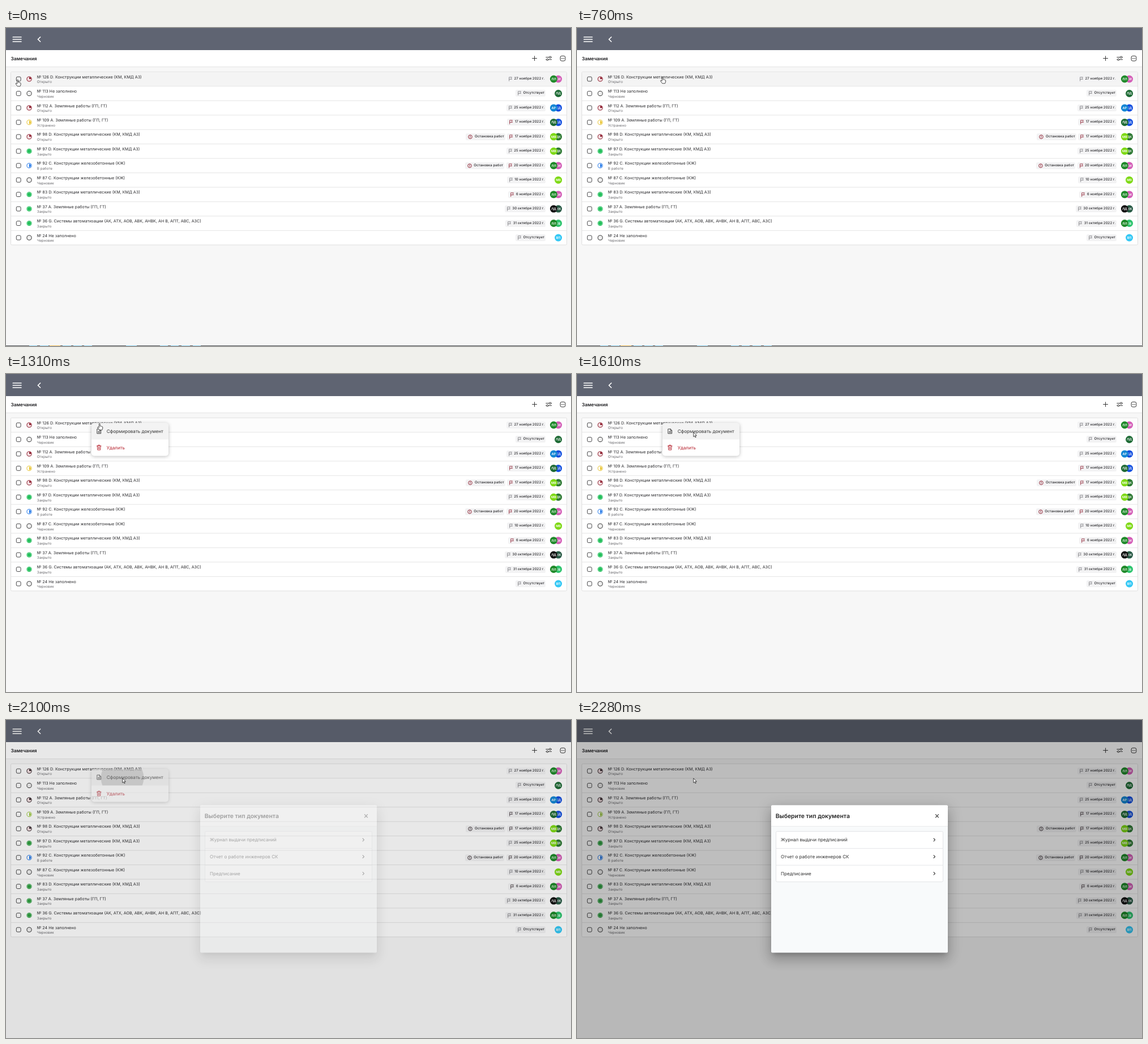
These frames come from a looping animation (998x561 px, 2.46 s). An HTML page:

```html
<!DOCTYPE html>
<html lang="ru">
<head>
<meta charset="utf-8">
<title>Замечания</title>
<style>
html, body { margin: 0; width: 100%; height: 100%; overflow: hidden; background: #f7f7f7; }
#stage { position: relative; width: 998px; height: 561px; overflow: hidden; background: #f7f7f7;
  font-family: Inter, "Noto Sans", sans-serif; text-rendering: geometricPrecision;
  --red: #8b1a2b; --yellow: #e8c22a; --green: #22bf5b; }
#stage.dimmed { --red: #33262b; --yellow: #9ac93a; --green: #2f9f40; }
svg { display: block; }
.layer { position: absolute; left: 0; top: 0; }
.line { fill: none; stroke-linecap: round; stroke-linejoin: round; }
.title { font-size: 7.17px; fill: #2b2b2e; }
.state { font-size: 6.24px; fill: #68686c; }
.item { font-size: 8.1px; fill: #333; }
.ava { font-size: 5.6px; font-weight: 600; fill: #fff; text-anchor: middle; }
.pills { position: absolute; right: 45px; height: 12px; display: flex; gap: 3.5px; }
.pill { display: flex; align-items: center; gap: 3.5px; padding: 0 2px 0 4px; border-radius: 2.5px;
  background: #f3f3f4; color: #2b2b2e; font-size: 6.15px; font-weight: 500; line-height: 12px; white-space: nowrap; }
</style>
</head>
<body>
<div id="stage"></div>
<script>
const LOOP = 2460, TOP = 77.3, PITCH = 25.45;
const RED = 'var(--red)', YELLOW = 'var(--yellow)', GREEN = 'var(--green)', GREY = '#77777b', DARK = '#333';

const STEEL = 'Конструкции металлические (КМ, КМД АЗ)';
const CONCRETE = 'Конструкции железобетонные (КЖ)';
const EARTH = 'Земляные работы (ГП, ГТ)';
const STATES = { open: 'Открыто', draft: 'Черновик', fixed: 'Устранено', closed: 'Закрыто', work: 'В работе' };
const LL = ['ЛЛ', '#1f8a2a'], SI = ['СИ', '#d45fb8'], MV = ['МВ', '#7ed915'],
      DK = ['ДК', '#2f7a35'], KD = ['КД', '#1450e0'], LD = ['ЛД', '#1e6b35'];

// title, state, date, avatars, late, stopped
const ROWS = [
  ['№ 126 D. ' + STEEL, 'open', '27 ноября 2022 г.', [LL, SI]],
  ['№ 113 Не заполнено', 'draft', 'Отсутствует', [LD]],
  ['№ 112 А. ' + EARTH, 'open', '25 ноября 2022 г.', [['АР', '#1487d4'], KD]],
  ['№ 109 А. ' + EARTH, 'fixed', '17 ноября 2022 г.', [LD, KD], 1],
  ['№ 98 D. ' + STEEL, 'open', '17 ноября 2022 г.', [MV, DK], 1, 1],
  ['№ 97 D. ' + STEEL, 'closed', '25 ноября 2022 г.', [MV, DK]],
  ['№ 92 С. ' + CONCRETE, 'work', '20 ноября 2022 г.', [LL, SI], 1, 1],
  ['№ 87 С. ' + CONCRETE, 'draft', '10 ноября 2022 г.', [MV]],
  ['№ 83 D. ' + STEEL, 'closed', '6 ноября 2022 г.', [LL, SI], 1],
  ['№ 37 А. ' + EARTH, 'closed', '30 октября 2022 г.', [['ЛД', '#111'], ['ЖК', '#285a45']]],
  ['№ 36 G. Системы автоматизации (АК, АТХ, АОВ, АВК, АНВК, АН В, АПТ, АВС, АЗС)', 'closed',
    '31 октября 2022 г.', [LL, ['ЕВ', '#2fc56f']]],
  ['№ 24 Не заполнено', 'draft', 'Отсутствует', [['ВП', '#35c8f5']]]
];

const rect = (x, y, w, h, fill, more = '') =>
  `<rect x="${x}" y="${y}" width="${w}" height="${h}" fill="${fill}" ${more}/>`;
const circle = (x, y, r, fill, more = '') => `<circle cx="${x}" cy="${y}" r="${r}" fill="${fill}" ${more}/>`;
const line = (d, color, width = 1) => `<path class="line" d="${d}" stroke="${color}" stroke-width="${width}"/>`;
const text = (x, y, cls, s, more = '') => `<text x="${x}" y="${y}" class="${cls}" ${more}>${s}</text>`;
const svg = body => `<svg class="layer" width="998" height="561" viewBox="0 0 998 561">${body}</svg>`;

function stateIcon(kind, y) {
  const ring = (color, fill) => circle(41, y, 4.1, fill, `stroke="${color}"`);
  const half = color => ring(color, '#fff') + `<path d="M41 ${y - 2.9}a2.9 2.9 0 0 1 0 5.8z" fill="${color}"/>`;
  switch (kind) {
    case 'open': return ring(RED, '#f3dfe1') + `<path d="M41 ${y}v-3.4a3.4 3.4 0 0 1 3.4 3.4z" fill="${RED}"/>`;
    case 'draft': return ring(DARK, '#f0f0f0');
    case 'fixed': return half(YELLOW);
    case 'work': return half('#1c74e8');
    default: return ring(GREEN, '#c9f0d7') + circle(41, y, 3.2, GREEN);
  }
}

function avatars(list, y) {
  const xs = list.length > 1 ? [967.4, 975.6] : [975.6];
  return list.map(([name, color], i) =>
    circle(xs[i], y, 6.5, color) + text(xs[i], y + 2, 'ava', name)).reverse().join('');
}

function row([title, state, , people], i) {
  const y = TOP + PITCH * (i + .5);
  return (i ? rect(9, y - PITCH / 2 - .4, 981, .9, '#e2e2e2') : '') +
    rect(18.3, y - 3.9, 7.8, 7.8, 'none', 'rx="2" stroke="#3a3a3d" stroke-width=".95"') +
    stateIcon(state, y) +
    text(54.5, y - 1.4, 'title', title) + text(54.8, y + 7.4, 'state', STATES[state]) + avatars(people, y);
}

function pills([, , date, , late, stopped], i) {
  const flag = `<svg width="6" height="8" viewBox="0 0 6 8">${line('M.7 7.4V.8H5.4L4.4 2.6 5.4 4.4H.7', late ? RED : GREY, .8)}</svg>`;
  const alarm = `<svg width="8" height="8" viewBox="0 0 8 8">${circle(4, 4, 3.3, 'none', `stroke="${RED}" stroke-width=".9"`)}${line('M4 2.2V4.3M4 5.7V5.8', RED, .9)}</svg>`;
  const pill = (icon, s) => `<span class="pill">${icon}${s}</span>`;
  return `<div class="pills" style="top:${TOP + PITCH * (i + .5) - 6}px">` +
    (stopped ? pill(alarm, 'Остановка работ') : '') + pill(flag, date) + '</div>';
}

const header = rect(0, 0, 998, 39, '#5f6472') +
  [16, 20, 24].map(y => line(`M12.3 ${y}H26.9`, '#fff', 1.7)).join('') +
  line('M60.6 16L56.4 20 60.6 24', '#fff', 1.7);

const toolbar = rect(0, 39, 998, 29, '#fff') + rect(0, 68, 998, 1, '#e4e4e4') +
  text(8.4, 56.6, '', 'Замечания', 'font-size="8.32" font-weight="600" fill="#1d1d20"') +
  line('M929.6 53.6h8M933.6 49.6v8', DARK) +
  line('M953.8 51.6h5.6M962.8 51.6h.8M953.8 55.7h.8M958 55.7h5.6', DARK) +
  circle(961.1, 51.6, 1.6, 'none', 'stroke="#333"') + circle(956.3, 55.7, 1.6, 'none', 'stroke="#333"') +
  rect(979.1, 49.3, 8.8, 8.8, 'none', 'rx="2.6" stroke="#333"') +
  [981.4, 983.5, 985.6].map(x => circle(x, 53.7, .7, DARK)).join('');

const table = rect(8.5, 77.3, 982, PITCH * 12, '#fff', 'rx="2" stroke="#e0e0e0"') +
  `<clipPath id="firstRow">${rect(9, 77.8, 981, 24.6, '#000')}</clipPath>` +
  `<g clip-path="url(#firstRow)">${rect(9, 77, 981, 26, '#f4f4f4', 'id="hover"')}${circle(151, 92, 0, '#000', 'id="rowRipple"')}</g>` +
  ROWS.map(row).join('');

const taskbar = rect(0, 560, 998, 1, '#55585c') +
  [[41, 14], [60, 15], [100, 15], [119, 15], [138, 14], [212, 19], [272, 14], [291, 14], [310, 15], [330, 14]]
    .map(([x, w]) => rect(x, 560, w, 1, '#8fd0ee')).join('') + rect(77, 560, 19, 1, '#f0c060');

const menu = `<clipPath id="firstItem">${rect(151, 86.5, 136, 29, '#000')}</clipPath>
  <clipPath id="menuBox">${rect(151, 86.5, 136, 58, '#000', 'rx="5"')}</clipPath>
  <g id="menu">${rect(151, 86.5, 136, 58, '#fff', 'rx="5" style="filter:drop-shadow(0 1px 3px #0004)"')}
  <g clip-path="url(#menuBox)">${rect(151, 86.5, 136, 29, '#f3f3f3')}
  <g clip-path="url(#firstItem)">${circle(205.5, 102, 0, '#000', 'id="itemRipple" opacity=".17"')}</g></g>` +
  line('M161.2 97h4l2.4 2.4v5.6h-6.4zM165 97v2.6h2.6M162.8 101.4h3.2M162.8 103.2h3.2', DARK, .9) +
  text(177.7, 103.9, 'item', 'Сформировать документ') +
  line('M160.4 127h7.6M161.2 127l.6 7h4.8l.6-7M162.6 127v-1.6h3.2v1.6M163.4 129.2v2.8M165 129.2v2.8', '#b5202c', .9) +
  text(177.7, 132.9, 'item', 'Удалить', 'style="fill:#b5202c"') + '</g>';

const BOX = { x: 343, y: 150.6, w: 312, h: 259.9 };
const shadow = (dy, blur, spread, alpha) =>
  rect(BOX.x - spread, BOX.y - spread + dy, BOX.w + 2 * spread, BOX.h + 2 * spread, '#000',
    `opacity="${alpha}" style="filter:blur(${blur / 2}px)"`);

const dialog = '<g id="dialog">' +
  shadow(5.7, 7.8, -3.6, .2) + shadow(12.5, 19.8, 1.6, .14) + shadow(4.7, 24, 4.2, .12) +
  rect(BOX.x, BOX.y, BOX.w, BOX.h, '#f8fafb', 'rx="2"') +
  `<path d="M343 187.5V152.6a2 2 0 0 1 2-2H653a2 2 0 0 1 2 2V187.5z" fill="#fff"/>` +
  rect(343, 187.2, 312, .9, '#e6e8ea') +
  text(350.7, 173.1, '', 'Выберите тип документа', 'font-size="10.4" font-weight="600" fill="#222"') +
  line('M633.4 166.7l5.2 5.2M638.6 166.7l-5.2 5.2', DARK, 1.1) +
  rect(351.5, 196.5, 295, 89, '#fff', 'rx="2" stroke="#e2e4e7"') +
  ['Журнал выдачи предписаний', 'Отчет о работе инженеров СК', 'Предписание'].map((s, i) => {
    const y = 211.4 + i * 29.7;
    return text(360, y + 3, 'item', s) + line(`M630.1 ${y - 2.4}l2.4 2.4-2.4 2.4`, DARK, 1.1) +
      (i ? rect(352, y - 15.1, 294, .9, '#e2e4e7') : '');
  }).join('') + '</g>';

const pointer = 'stroke="#111" stroke-width=".75" stroke-linejoin="round" fill="#fff"';
const cursor = `<g id="cursor">
  <path id="hand" ${pointer} d="M-1.8 1.2V-4.7a.9.9 0 0 1 1.8 0V-1.1q.9-.5 1.6.3 .9-.4 1.5.4 1.4-.2 1.5 1.2V3L3.5 5.8H-1.3L-4.2 1.9q-.8-1.3.4-1.5Q-2.8.3-1.8 1.6z"/>
  <path id="arrow" ${pointer} d="M-2.6-4.8V3.1L-.8 1.5 .5 4.3 1.8 3.7 .5 1H2.9z"/></g>`;

const stage = document.getElementById('stage');
stage.innerHTML =
  svg(header + toolbar + table + `<g id="taskbar">${taskbar}</g>`) + ROWS.map(pills).join('') +
  svg(menu + rect(0, 0, 998, 561, '#000', 'id="dim"') + dialog + cursor);

const $ = Object.fromEntries([...stage.querySelectorAll('[id]')].map(el => [el.id, el]));

// [ms, value] pairs, linear between
const TRACKS = {
  x: [[1200, 152], [1310, 166], [1460, 190], [1610, 208.4]],
  y: [[1200, 92], [1310, 93], [1460, 101], [1610, 107.6]],
  hover: [[1180, 1], [1320, .25]],
  rowR: [[940, 0], [1010, 88], [1300, 460]],
  rowA: [[1100, .11], [1250, 0]],
  menuIn: [[1150, 0], [1270, 1]],
  menuOut: [[2065, 1], [2100, .72], [2180, 0]],
  itemR: [[1950, 0], [2060, 24], [2100, 37.5], [2180, 62]],
  dim: [[2045, 0], [2060, .015], [2100, .09], [2200, .23], [2270, .255]],
  dialog: [[2045, 0], [2060, .04], [2100, .36], [2180, .85], [2260, 1]]
};

function at(track, t) {
  const keys = TRACKS[track];
  if (t <= keys[0][0]) return keys[0][1];
  for (let i = 1; i < keys.length; i++) {
    const [a, va] = keys[i - 1], [b, vb] = keys[i];
    if (t < b) return va + (vb - va) * (t - a) / (b - a);
  }
  return keys[keys.length - 1][1];
}

function draw(t) {
  const p = Math.min(1, Math.max(0, (t - 410) / 340)), glide = 1 - p * p * (3 - 2 * p);
  const x = at('x', t) - 130.5 * glide, y = at('y', t) + 5 * glide;
  const open = at('menuIn', t), scale = .8 + .2 * open, dim = at('dim', t);
  stage.classList.toggle('dimmed', dim > 0);
  $.cursor.setAttribute('transform', `translate(${x} ${y})`);
  $.hand.setAttribute('opacity', t < 1345 ? 1 : 0);
  $.arrow.setAttribute('opacity', t < 1345 ? 0 : 1);
  $.taskbar.setAttribute('opacity', t < 940 ? 1 : 0);
  $.hover.setAttribute('opacity', at('hover', t));
  $.rowRipple.setAttribute('r', at('rowR', t));
  $.rowRipple.setAttribute('opacity', at('rowA', t));
  $.menu.setAttribute('opacity', open * at('menuOut', t));
  $.menu.setAttribute('transform', `translate(151 86.5) scale(${scale}) translate(-151 -86.5)`);
  $.itemRipple.setAttribute('r', at('itemR', t));
  $.dim.setAttribute('opacity', dim);
  $.dialog.setAttribute('opacity', at('dialog', t));
}

const start = performance.now();
function tick() {
  draw((performance.now() - start) % LOOP);
  requestAnimationFrame(tick);
}
tick();
</script>
</body>
</html>
```
